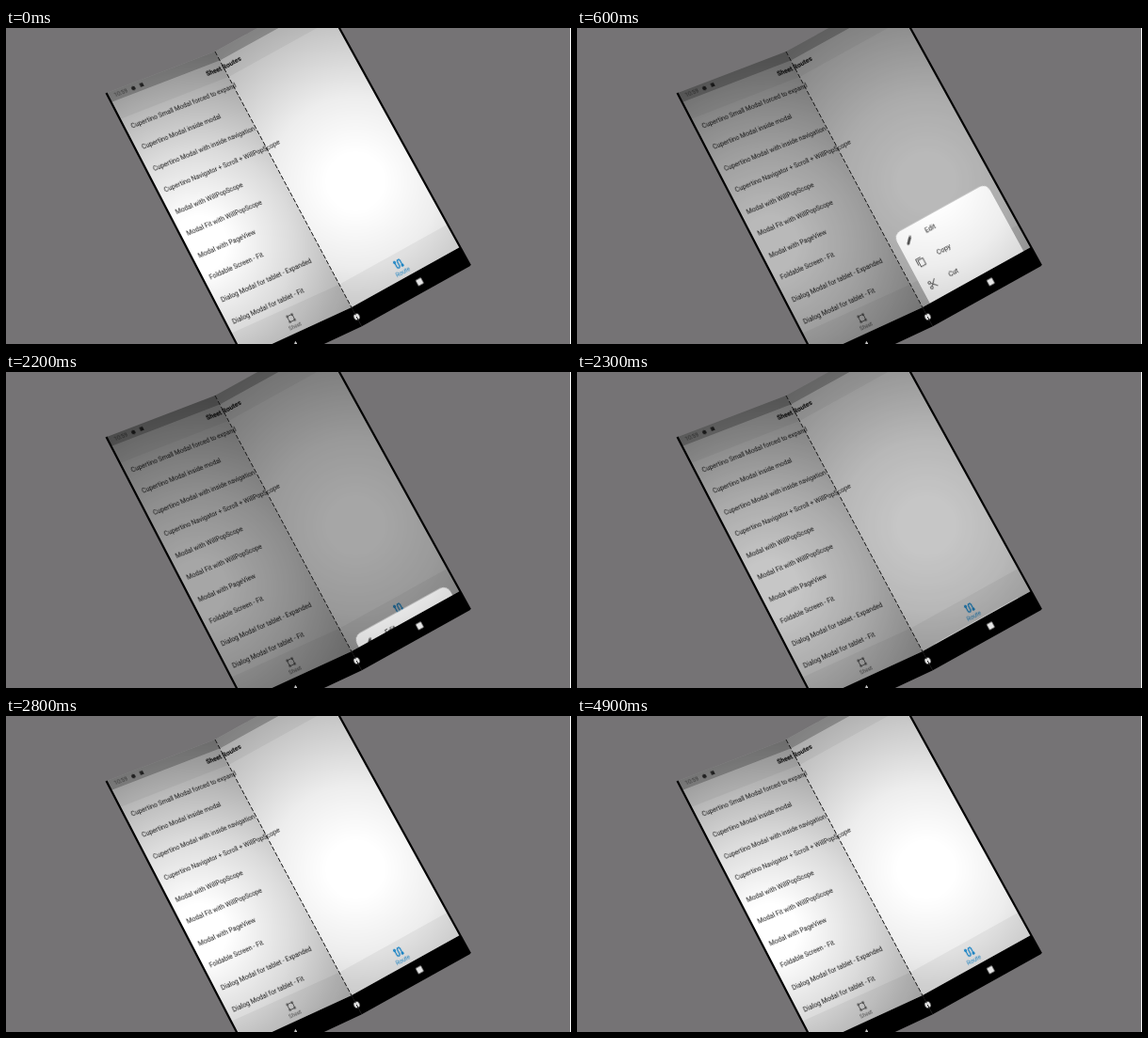
An HTML page for the animation above (5.3 s loop, 600 px wide and 336 px high).

```html
<!DOCTYPE html>
<html lang="en">
<head>
<meta charset="utf-8">
<title>Sheet on a foldable screen</title>
<style>
  html, body { margin: 0; width: 100%; height: 100%; overflow: hidden; background: #757375; }
  #stage { position: relative; width: 600px; height: 336px; overflow: hidden; }
  #stage > svg { position: absolute; inset: 0; }
  /* The screen is laid out in device units and painted at half size, close to its final size. */
  .half { position: absolute; left: 0; top: 0; width: 148px; height: 357px; overflow: hidden; transform-origin: 0 0; }
  .half + .half .screen { left: -148px; }
  .screen { position: absolute; left: 0; top: 0; width: 592px; height: 714px; background: #000;
            transform: scale(.5); transform-origin: 0 0;
            font: 16px Roboto, sans-serif; text-rendering: geometricPrecision; color: #1c1c1c; }
  .screen div, .screen svg, .screen span { position: absolute; white-space: nowrap; }
  .app { width: 592px; height: 666px; overflow: hidden; background: #fff; }
  .status { width: 592px; height: 24px; background: rgba(0,0,0,.24); font-size: 14px; line-height: 24px; color: #555; }
  .title { top: 0; width: 592px; height: 68px; line-height: 86px; text-align: center;
           font-size: 16px; font-weight: 600; color: #000; background: #f2f2f2; }
  .row { left: 16px; line-height: 20px; }
  .tabs { top: 608px; width: 592px; height: 58px; background: #f2f2f2; }
  .tab { width: 296px; height: 58px; text-align: center; }
  .tab svg { left: 136px; top: 12px; }
  .tab span { left: 0; width: 296px; top: 37px; line-height: 16px; font-size: 14px; }
  .barrier { inset: 0; background: #000; }
  .sheet { left: 316px; top: 366px; width: 256px; height: 280px; border-radius: 18px; background: #fff; }
  .sheet svg { left: 16px; }
  .sheet span { left: 72px; line-height: 20px; }
</style>
</head>
<body>
<div id="stage">
  <div class="half"></div>
  <div class="half"></div>
  <svg width="600" height="336" fill="none">
    <defs>
      <radialGradient id="left" gradientUnits="userSpaceOnUse" cx="205" cy="230" r="200">
        <stop offset=".15" stop-opacity="0"/><stop offset=".5" stop-opacity=".14"/><stop offset="1" stop-opacity=".4"/>
      </radialGradient>
      <radialGradient id="right" gradientUnits="userSpaceOnUse" cx="371" cy="163" r="200">
        <stop offset=".15" stop-opacity="0"/><stop offset=".45" stop-opacity=".07"/><stop offset="1" stop-opacity=".3"/>
      </radialGradient>
    </defs>
    <polygon class="light" fill="url(#left)"/>
    <polygon class="light" fill="url(#right)"/>
    <path d="M106.5 69L262 369M333.7 -36.9L493 252.5" stroke="#000" stroke-width="2.2"/>
    <path d="M222 25L377 316" stroke="#1a1a1a" stroke-dasharray="4.6 2.2"/>
    <path d="M599.5 0V336" stroke="#fff"/>
  </svg>
</div>
<script>
const LOOP = 5300, STEP = 100;
const HALF = 296, HEIGHT = 666, SCALE = .5;
const ROW_PITCH = 55, SHEET_TRAVEL = 300;

const rows = [
  'Cupertino Small Modal forced to expand', 'Cupertino Modal inside modal',
  'Cupertino Modal with inside navigation', 'Cupertino Navigator + Scroll + WillPopScope',
  'Modal with WillPopScope', 'Modal Fit with WillPopScope', 'Modal with PageView',
  'Foldable Screen - Fit', 'Dialog Modal for tablet - Expanded', 'Dialog Modal for tablet - Fit'
];

const icon = (body, color, attrs = '') =>
  `<svg width="24" height="24" viewBox="0 0 24 24" fill="none" stroke="${color}" stroke-width="2" ${attrs}>${body}</svg>`;

const actions = {
  Edit: '<path d="M4 20v-3L15 6l3 3L7 20zM17 4l3 3" fill="#555"/>',
  Copy: '<path d="M16 2H3v15M7 6h13v16H7z"/>',
  Cut: '<circle cx="6" cy="6" r="3"/><circle cx="6" cy="18" r="3"/><path d="M8 8l13 13M8 16L21 3"/>',
  Move: '<path d="M3 19V5h7l2 3h9v11z"/>',
  Delete: '<path d="M7 8h10v12H7zM5 5h14M10 3h4" fill="#555"/>'
};

const sheetIcon = '<path d="M5 5h14v14H5z"/><path d="M3 3h5v5H3zM16 3h5v5h-5zM3 16h5v5H3zM16 16h5v5h-5z" fill="#666" stroke="none"/>';
const routeIcon = '<circle cx="5" cy="5" r="2"/><circle cx="19" cy="19" r="2"/><path d="M5 7v10a3.5 3.5 0 0 0 7 0V7a3.5 3.5 0 0 1 7 0v10"/>';

const screen = `<div class="screen">
  <div class="app">
    <div class="title">Sheet Routes</div>
    ${rows.map((text, i) => `<div class="row" style="top:${82 + ROW_PITCH * i}px">${text}</div>`).join('')}
    <div class="tabs">
      <div class="tab" style="color:#666">${icon(sheetIcon, '#666')}<span style="font-size:13px">Sheet</span></div>
      <div class="tab" style="left:${HALF}px;color:#128bd6">${icon(routeIcon, '#128bd6', 'style="stroke-width:2.8"')}<span>Route</span></div>
    </div>
    <div class="status"><span style="left:14px">10:59</span>
      <svg width="120" height="24" fill="#333"><circle cx="65" cy="12" r="5"/><path d="M83 7h9v9h-9z"/></svg>
    </div>
    <div class="barrier"></div>
    <div class="sheet">${Object.entries(actions).map(([name, body], i) =>
      icon(body, '#555', `style="top:${16 + 56 * i}px"`) + `<span style="top:${18 + 56 * i}px">${name}</span>`).join('')}
    </div>
  </div>
  <svg width="592" height="48" style="top:${HEIGHT}px" fill="#e4e4e4">
    <path d="M118 24l14 -8v16z" fill="#ccc"/><circle cx="296" cy="24" r="7"/><path d="M461 17h14v14h-14z"/>
  </svg>
</div>`;

// Perspective matrix taking a w by h rectangle to the corners TL, TR, BR, BL.
function perspective(w, h, [[x0, y0], [x1, y1], [x2, y2], [x3, y3]]) {
  const ax = x1 - x2, bx = x3 - x2, sx = x0 - x1 + x2 - x3;
  const ay = y1 - y2, by = y3 - y2, sy = y0 - y1 + y2 - y3;
  const det = ax * by - bx * ay;
  const g = (sx * by - bx * sy) / det, k = (ax * sy - sx * ay) / det;
  return `matrix3d(${[
    (x1 - x0 + g * x1) / w, (y1 - y0 + g * y1) / w, 0, g / w,
    (x3 - x0 + k * x3) / h, (y3 - y0 + k * y3) / h, 0, k / h,
    0, 0, 1, 0, x0, y0, 0, 1
  ].map(n => n.toFixed(9)).join()})`;
}

const foldTop = [222, 25], foldBottom = [367, 297];
const quads = [
  [[107, 69], foldTop, foldBottom, [252, 350]],
  [foldTop, [333.7, -36.9], [482, 233], foldBottom]
];
const lights = document.querySelectorAll('.light');
document.querySelectorAll('.half').forEach((half, i) => {
  half.innerHTML = screen;
  half.style.transform = perspective(HALF * SCALE, HEIGHT * SCALE, quads[i]);
  lights[i].setAttribute('points', quads[i].join(' '));
});

const barriers = document.querySelectorAll('.barrier');
const sheets = document.querySelectorAll('.sheet');
const progress = (t, from, to) => Math.min(1, Math.max(0, (t - from) / (to - from)));
const easeOut = u => 1 - (1 - u) ** 3;
const easeInOut = u => (1 - Math.cos(Math.PI * u)) / 2;

function draw() {
  const t = Math.floor(performance.now() % LOOP / STEP) * STEP;
  const moving = t >= 500 && t < 2800;
  const open = moving ? easeOut(progress(t, 465, 1000)) * (1 - easeInOut(progress(t, 1700, 2320))) : 0;
  const shade = moving ? .42 * easeOut(progress(t, 430, 1000)) / (1 + Math.exp((t - 2310) / 70)) : 0;
  barriers.forEach(b => b.style.opacity = shade);
  sheets.forEach(s => s.style.transform = `translateY(${(1 - open) * SHEET_TRAVEL}px)`);
  requestAnimationFrame(draw);
}
draw();
</script>
</body>
</html>
```
